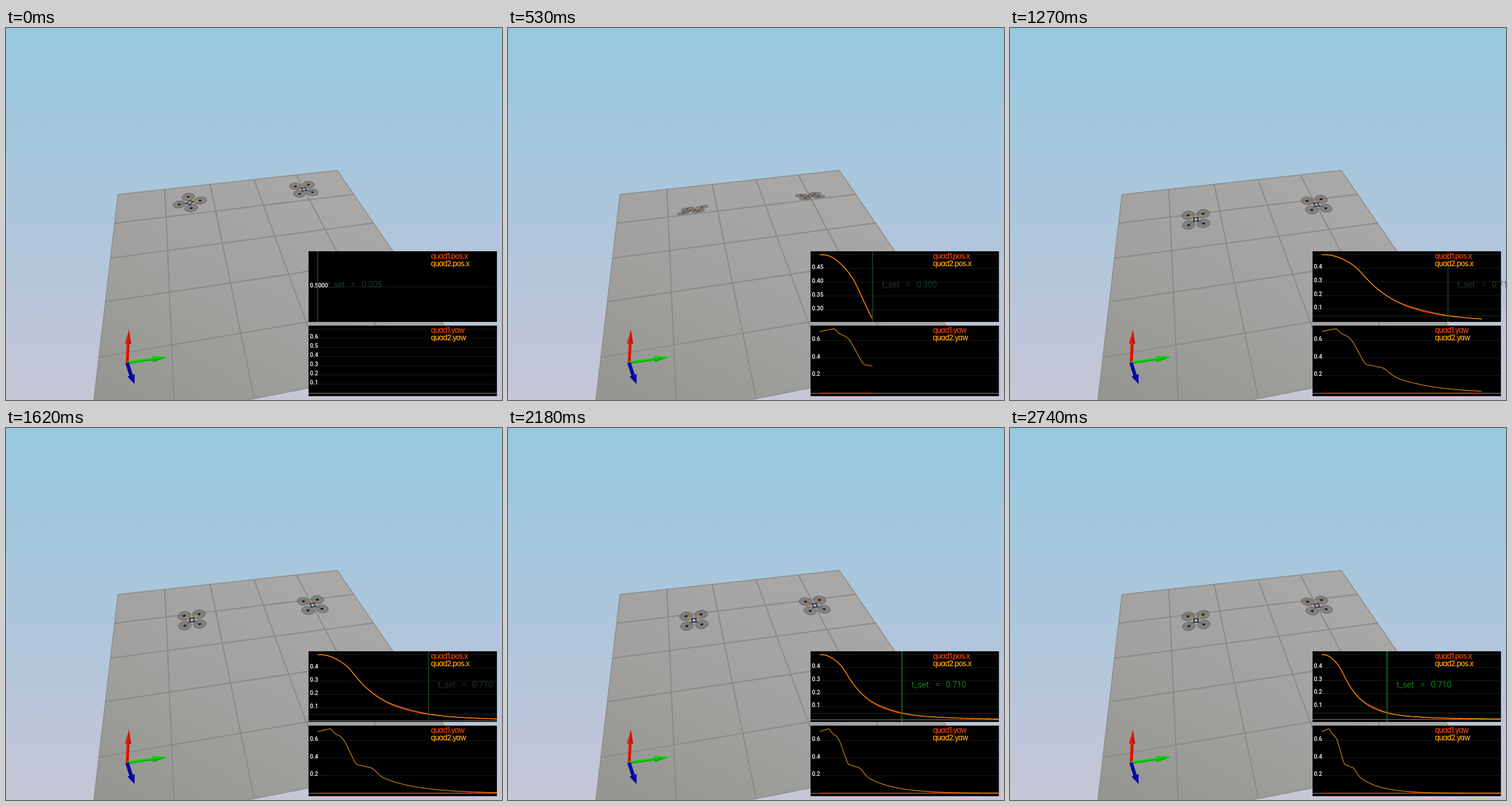
An HTML page with a canvas for the animation above (2.81 s loop, 864 px wide and 648 px high).

```html
<!DOCTYPE html>
<html lang="en">
<head>
<meta charset="utf-8">
<title>Quadcopter settling time</title>
<style>
html, body { margin: 0; width: 100%; height: 100%; overflow: hidden; }
canvas { position: absolute; left: 0; top: 0; }
p {
  position: absolute; left: 740px; margin: 0; white-space: pre;
  font: 500 13px/13px Inter, Roboto, sans-serif;
  font-feature-settings: "cv11"; letter-spacing: -1px; color: #ffa800;
}
b { font-weight: 500; color: #f0400c; }
</style>
</head>
<body>
<canvas id="stage" width="864" height="648"></canvas>
<p style="top:391px"><b>quad1.pos.x</b>
quad2.pos.x</p>
<p style="top:520px"><b>quad1.yaw</b>
quad2.yaw</p>
<script>
const ctx = document.getElementById('stage').getContext('2d');
const LOOP = 2810, STEPS = 35, START = 0.005, SETTLED = 0.71, BAND = 0.05;
const X0 = 543, SPAN = 312, HEIGHT = 112;
const LEFT = 527, PANEL_W = 328.4, PANEL_H = 123.3;
const RED = '#e8380a', ORANGE = 'rgba(255,165,10,.75)';

// Step responses of the two vehicles
const bell = (x, mid, width) => Math.exp(-(((x - mid) / width) ** 2));
const pos1 = t => 0.5 / (1 + (t / 0.3145) ** 2.7) + 0.015 * bell(t, 0.2, 0.06);
const pos2 = t => pos1(t) + 0.008 * bell(t, 0.57, 0.13);
const yaw1 = () => 0;
const yaw2 = t => 1.055 * Math.exp(-4.25 * t)
  - 0.355 * Math.max(0, 1 - t / 0.09) ** 1.2
  + 0.095 * bell(t, 0.165, 0.048)
  - 0.035 * bell(t, 0.25, 0.025)
  + 0.045 * bell(t, 0.35, 0.045);
const YAW_PEAK = 0.08;

// How open the rotors look: the vehicles lean back while braking
const tilt = t => 1 - 0.72 * bell(Math.log(t / 0.33), 0, 0.509) - 0.17 * bell(t, 0, 0.05);

// Screen refreshes: a slow start, then an even rate
const SLOW = [130, 130, 70, 130, 70];
const hold = i => i < 10 ? SLOW[i % 5] : 70;
function stepAt(ms) {
  let i = 0;
  while (i < STEPS - 1 && ms >= hold(i)) ms -= hold(i++);
  return i;
}
function simTime(i) {
  if (i < 5) return Math.max(START, 0.06 * i);
  return i < 9 ? 0.3 + 0.1 * (i - 5) : 0.7 + 0.0495 * (i - 9);
}

function line(pts, color, width) {
  ctx.beginPath();
  pts.forEach(p => ctx.lineTo(p[0], p[1]));
  ctx.strokeStyle = color;
  ctx.lineWidth = width;
  ctx.stroke();
}
function poly(pts, fill) {
  ctx.beginPath();
  pts.forEach(p => ctx.lineTo(p[0], p[1]));
  ctx.closePath();
  ctx.fillStyle = fill;
  ctx.fill();
}
function gradient(x0, y0, x1, y1, ...colors) {
  const g = ctx.createLinearGradient(x0, y0, x1, y1);
  colors.forEach((c, i) => g.addColorStop(i / (colors.length - 1), c));
  return g;
}
function text(s, x, y, size, color, weight) {
  ctx.font = `${weight} ${size}px Roboto, sans-serif`;
  ctx.fillStyle = color;
  ctx.fillText(s, x, y);
}

// Perspective of the floor, u and v from 0 to 1
function ground(u, v) {
  const w = 1 + 0.09 * u - 0.447 * v;
  return [(195 + 433.9 * u - 113.9 * v) / w, (290 - 19.7 * u + 98.2 * v) / w];
}

function scene() {
  ctx.fillStyle = gradient(0, 0, 0, 648, '#96c9e0', '#adc6dc', '#c6c6d6');
  ctx.fillRect(0, 0, 864, 648);
  poly([ground(0, 0), ground(1, 0), ground(1, 1), ground(0, 1)],
    gradient(470, 250, 250, 660, '#a9a8a7', '#a2a19f', '#969692'));
  for (let i = 0; i <= 5; i++) {
    const k = i / 5, width = i % 5 ? 2.2 : 1.4;
    line([ground(k, 0), ground(k, 1)], '#8b8a88', width);
    line([ground(0, k), ground(1, k)], '#8b8a88', width);
  }
}

function arrow(tip, neck, width, head, light, dark) {
  const o = [211, 583];
  const dx = tip[0] - o[0], dy = tip[1] - o[1], len = Math.hypot(dx, dy);
  const nx = -dy / len, ny = dx / len;
  const side = (p, s) => [p[0] + nx * s, p[1] + ny * s];
  poly([side(o, -width), side(neck, -width), side(neck, width), side(o, width)], light);
  poly([o, neck, side(neck, width), side(o, width)], dark);
  poly([tip, side(neck, -head), side(neck, head)], light);
  poly([tip, neck, side(neck, head)], dark);
}

// ax and ay are the screen directions of the body's side and depth axes
function drone([cx, cy], ax, ay, yaw, accent) {
  const c = Math.cos(yaw), s = Math.sin(yaw);
  const at = (a, b) => [a * c - b * s, a * s + b * c];
  const put = ([a, b]) => [cx + a * ax[0] + b * ay[0], cy + a * ax[1] + b * ay[1]];
  const disc = ([a, b], r, fill) => {
    ctx.save();
    ctx.transform(...ax, ...ay, cx, cy);
    ctx.beginPath();
    ctx.arc(a, b, r, 0, 7);
    ctx.restore();
    ctx.fillStyle = fill;
    ctx.fill();
  };
  const rotors = [[-1, -1], [1, -1], [-1, 1], [1, 1]];
  rotors.forEach(([a, b]) => {
    disc(at(a, b), 0.86, 'rgba(100,100,100,.55)');
    ctx.strokeStyle = '#606060';
    ctx.lineWidth = 1;
    ctx.stroke();
  });
  rotors.forEach(([a, b]) => {
    const front = b < 0;
    line([[cx, cy], put(at(a * 0.8, b * 0.8))], front ? accent : '#5c5e66', front ? 2 : 1.4);
    disc(at(a, b), 0.2, '#161616');
  });
  const box = r => [[-r, -r], [r, -r], [r, r], [-r, r]].map(([a, b]) => put(at(a, b * 1.3)));
  poly(box(0.36), '#2b303c');
  poly(box(0.19), '#a9b6c8');
}

function drones(t) {
  const s = 1 - pos2(t) / 0.5, q = tilt(t), drop = 6.5 * s * s;
  drone([320 + 4 * s, 304 + 25 * s + drop], [13, -1.5 - 1.5 * (1 - q)],
    [0.7, 8.6 * q], yaw2(t), '#bd9526');
  drone([519 + 15.7 * s, 281 + 22 * s + drop], [11.4 + 0.8 * s, -1.5],
    [3.4 + 0.6 * s, 8 * q], 0, '#b8592a');
}

function ticks(lo, hi) {
  const min = 15.8 * (hi - lo) / HEIGHT, unit = 10 ** Math.floor(Math.log10(min));
  const size = [1, 2, 5, 10].map(k => k * unit).find(k => k >= min);
  const digits = Math.max(1, -Math.floor(Math.log10(size) + 1e-9));
  const list = [];
  for (let k = Math.ceil(lo / size - 1e-6); k * size <= hi + 1e-9; k++) list.push(k * size);
  return { list, digits };
}

function panel(top, t, lo, hi, first, second, band) {
  const flat = hi - lo < 1e-4, mid = (hi + lo) / 2;
  const { list, digits } = flat ? { list: [mid], digits: 4 } : ticks(lo, hi);
  if (flat) { lo = mid - 5; hi = mid + 5; }
  const scale = SPAN / Math.max(1, t - START);
  const y = v => top + 6 + (hi - v) * HEIGHT / (hi - lo);
  const rule = (v, color, w) => line([[LEFT, y(v)], [LEFT + PANEL_W, y(v)]], color, w);

  ctx.save();
  ctx.beginPath();
  ctx.rect(LEFT, top, PANEL_W, PANEL_H);
  ctx.clip();
  ctx.fillStyle = '#000';
  ctx.fillRect(LEFT, top, PANEL_W, PANEL_H);
  list.forEach(v => rule(v, '#1d1d1d', 1));
  if (!flat) {
    rule(0, '#77757a', 1.2);
    if (band) rule(BAND, '#1b351b', 1);
  }
  const end = X0 + (t - START) * scale;
  [[first, RED], [second, ORANGE]].forEach(([f, color]) => {
    const pts = [];
    for (let x = X0; x < end; x++) pts.push([x, y(f(START + (x - X0) / scale))]);
    pts.push([end, y(f(t))]);
    line(pts, color, 1.4);
  });
  list.forEach(v => {
    const py = y(v);
    if (py > top + 9 && py < top + 115) text(v.toFixed(digits), 529.5, py + 0.8, 10, '#fff', 500);
  });
  ctx.restore();
  return scale;
}

function marker(t, scale) {
  const set = Math.min(t, SETTLED), x = X0 + (set - START) * scale;
  const done = t - SETTLED >= 0.5;
  line([[x, 389], [x, 512]], done ? '#0a9a14' : '#1f4f24', 1.4);
  const put = (s, dx) => text(s, x + dx, 451.5, 14.5, done ? '#0cc41a' : '#22552a', 300);
  put('t_set', 16.5);
  put('=', 58);
  put(set.toFixed(3), 76.5);
}

function draw(t) {
  scene();
  arrow([214, 526], [212.6, 550], 2.5, 5.5, '#e81a08', '#c01508');
  arrow([281, 573], [255, 576.7], 2.2, 5.5, '#08d808', '#0cb00c');
  arrow([224, 620], [218, 605], 3, 6.5, '#0808b4', '#060690');
  drones(t);
  const scale = panel(388.8, t, Math.min(pos1(t), 0.5), 0.5, pos1, pos2, true);
  panel(518.3, t, 0, yaw2(Math.min(t, YAW_PEAK)), yaw1, yaw2, false);
  marker(t, scale);
}

const begin = performance.now();
function tick() {
  draw(simTime(stepAt((performance.now() - begin) % LOOP)));
  requestAnimationFrame(tick);
}
tick();
</script>
</body>
</html>
```
